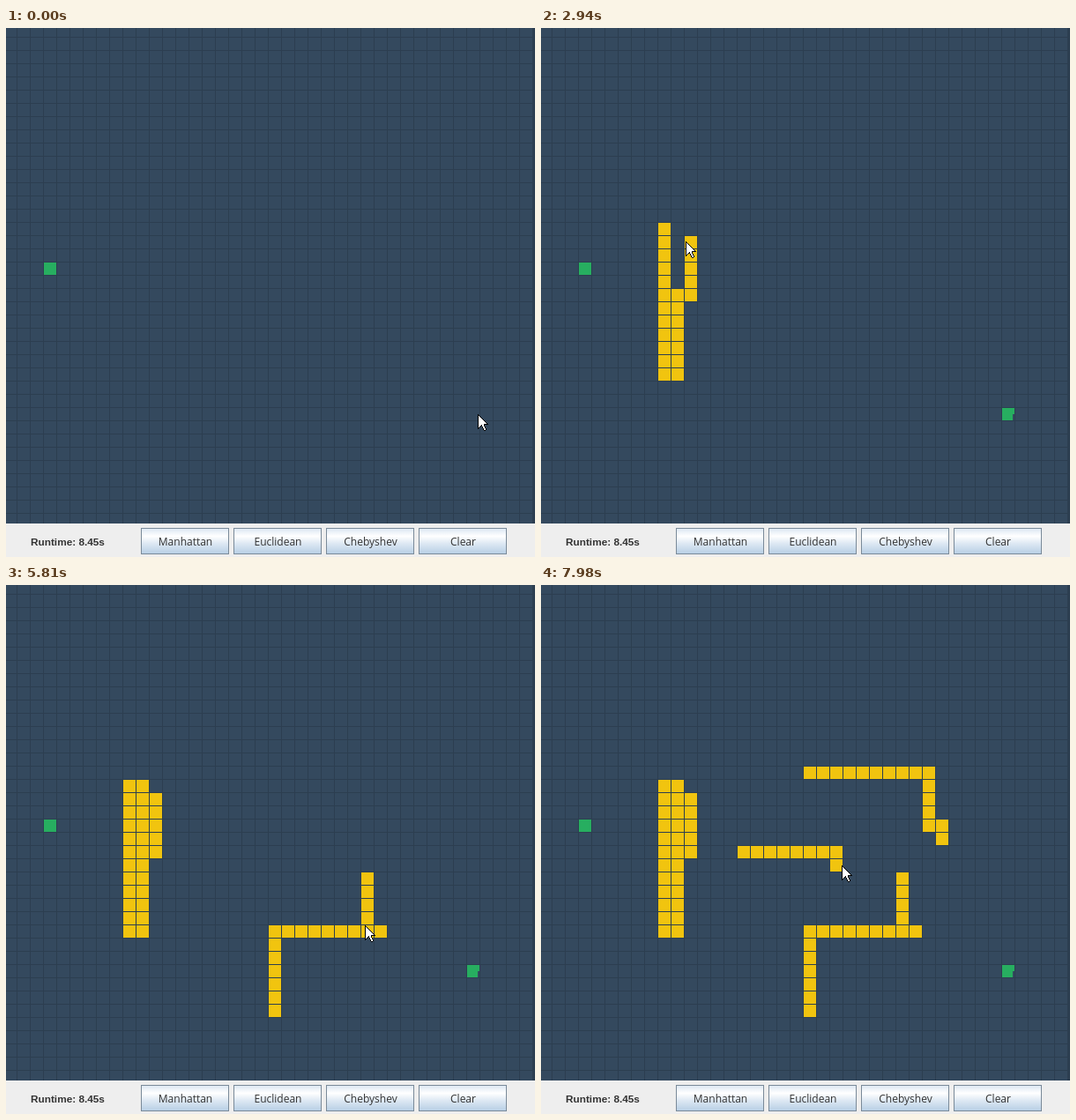
Recreate the animation shown at these times as an HTML page with a canvas. Size 600 by 600 pixels, loop 8000 ms.

```html
<!DOCTYPE html>
<html lang="en">
<head>
<meta charset="utf-8">
<title>Grid path editor</title>
<style>
html, body { margin: 0; width: 100%; height: 100%; overflow: hidden; background: #eee; color: #333; }
canvas { position: absolute; left: 0; top: 0; }
.label {
  position: absolute; left: 28px; top: 576px; white-space: nowrap;
  font: bold 11.8px/14px "Liberation Sans", Arial, sans-serif;
}
.buttons { position: absolute; left: 153px; top: 567px; display: flex; gap: 5px; }
.buttons div {
  width: 100px; height: 30px; box-sizing: border-box; padding-left: 1px;
  border: 1px solid #7a8a99; text-align: center;
  font: 12px/29px "Open Sans", "Noto Sans", sans-serif;
  background: linear-gradient(#dde8f3, #fff 30%, #dde8f3 60%, #b8cfe5);
}
</style>
</head>
<body>
<canvas id="board" width="600" height="562"></canvas>
<div class="label">Runtime: 8.45s</div>
<div class="buttons">
  <div>Manhattan</div><div>Euclidean</div><div>Chebyshev</div><div>Clear</div>
</div>
<script>
const LOOP = 8000, STEP = 70, CELL = 15, LEFT = 12, TOP = 10;
const SLATE = '#34495e', LINE = '#2c3e50', GREEN = '#27ae60', YELLOW = '#f1c40f';
const ctx = document.getElementById('board').getContext('2d');

// Painting drags at constant speed; moves are a direction and a length in pixels.
// A drag without its own place goes on from where the last one stopped.
const rest = { end: 420, stop: [535, 438] };
const drags = [
  { arrive: 840, start: 1050, end: 1750, at: [143, 224], moves: 'L6 D107 R6 D66' },
  { start: 2170, end: 2940, moves: 'R8 U94 R13 U61' },
  { start: 2940, end: 3010, moves: 'L17 U12' },
  { start: 3010, end: 3150, moves: 'R3 D53' },
  { arrive: 3710, start: 4060, end: 4830, at: [309, 480], moves: 'U86 R111' },
  { start: 4900, end: 5810, moves: 'L10 U62 L3 D54' },
  { arrive: 6160, start: 6230, end: 7070, at: [300, 211], moves: 'R140 D58 R11 D25 L4' },
  { arrive: 7560, start: 7630, end: 7980, at: [224, 303], moves: 'R107 D15 R10' }
];
const directions = { U: [0, -1], D: [0, 1], L: [-1, 0], R: [1, 0] };

let last = rest;
for (const drag of drags) {
  drag.at ??= last.stop;
  drag.arrive ??= drag.start;
  drag.legs = drag.moves.split(' ').map(m => [directions[m[0]], +m.slice(1)]);
  drag.length = drag.legs.reduce((sum, leg) => sum + leg[1], 0);
  drag.stop = follow(drag, 1);
  last = drag;
}

function follow({ at: [x, y], legs, length }, progress) {
  let left = progress * length;
  for (const [[dx, dy], size] of legs) {
    const d = Math.min(left, size);
    x += dx * d;
    y += dy * d;
    left -= d;
  }
  return [x, y];
}

// Between drags the hand swings over in a slight downward arc.
function travel(from, to, time) {
  const depart = from.end + STEP;
  const k = Math.max(0, Math.min(1, (time - depart) / (to.arrive - depart)));
  const [x, y] = from.stop, dx = to.at[0] - x, dy = to.at[1] - y;
  const sag = 0.11 * Math.hypot(dx, dy) * Math.sin(Math.PI * k);
  return [x + dx * k, y + dy * k + sag];
}

function pointerAt(time) {
  let previous = rest;
  for (const drag of drags) {
    if (time < drag.start) return travel(previous, drag, time);
    if (time <= drag.end) {
      return follow(drag, (time - drag.start) / (drag.end - drag.start));
    }
    previous = drag;
  }
  return previous.stop;
}

// Each wall cell with the time the pointer first paints it, from the press on.
const walls = new Map();
for (const { start, end } of drags) {
  for (let time = start - STEP; time <= end; time++) {
    const [x, y] = pointerAt(time);
    const key = Math.floor((x - LEFT) / CELL) + ',' + Math.floor((y - TOP) / CELL);
    if (!walls.has(key)) walls.set(key, time);
  }
}

function rect(color, x, y, w, h) {
  ctx.fillStyle = color;
  ctx.fillRect(x, y, w, h);
}

function fillCell(color, col, row) {
  rect(color, LEFT + 1 + col * CELL, TOP + 1 + row * CELL, CELL - 1, CELL - 1);
}

// Pixel-sharp arrow, built row by row from its head and its slanted tail.
function drawArrow(x, y) {
  function span(row, from, width, inside = width - 2) {
    if (width > 0) rect('#000', x + from, y + row, width, 1);
    if (inside > 0) rect('#fff', x + from + 1, y + row, inside, 1);
  }
  for (let row = 0; row < 11; row++) span(row, 0, row + 1);
  span(11, 0, 12, 6);
  for (let row = 12; row < 18; row++) {
    span(row, 0, 17 - row);
    span(row, row / 2 - 2 | 0, 4);
  }
  span(18, 7, 2);
}

function draw(time) {
  const now = Math.floor(time / STEP) * STEP;
  rect(SLATE, 0, 0, 600, 562);
  for (let x = LEFT; x < 600; x += CELL) rect(LINE, x, 0, 1, 562);
  for (let y = TOP; y < 562; y += CELL) rect(LINE, 0, y, 600, 1);
  rect(LINE, 597, 0, 3, 562);

  fillCell(GREEN, 2, 17);
  if (now >= 280) {
    fillCell(GREEN, 34, 28);
    rect(SLATE, 535, 438, 2, 7); // corner the pointer kept unpainted
  }
  for (const [key, painted] of walls) {
    if (painted <= now) fillCell(YELLOW, ...key.split(','));
  }
  drawArrow(...pointerAt(now).map(Math.round));
}

const begin = performance.now();
function tick() {
  draw((performance.now() - begin) % LOOP);
  requestAnimationFrame(tick);
}
tick();
</script>
</body>
</html>
```
